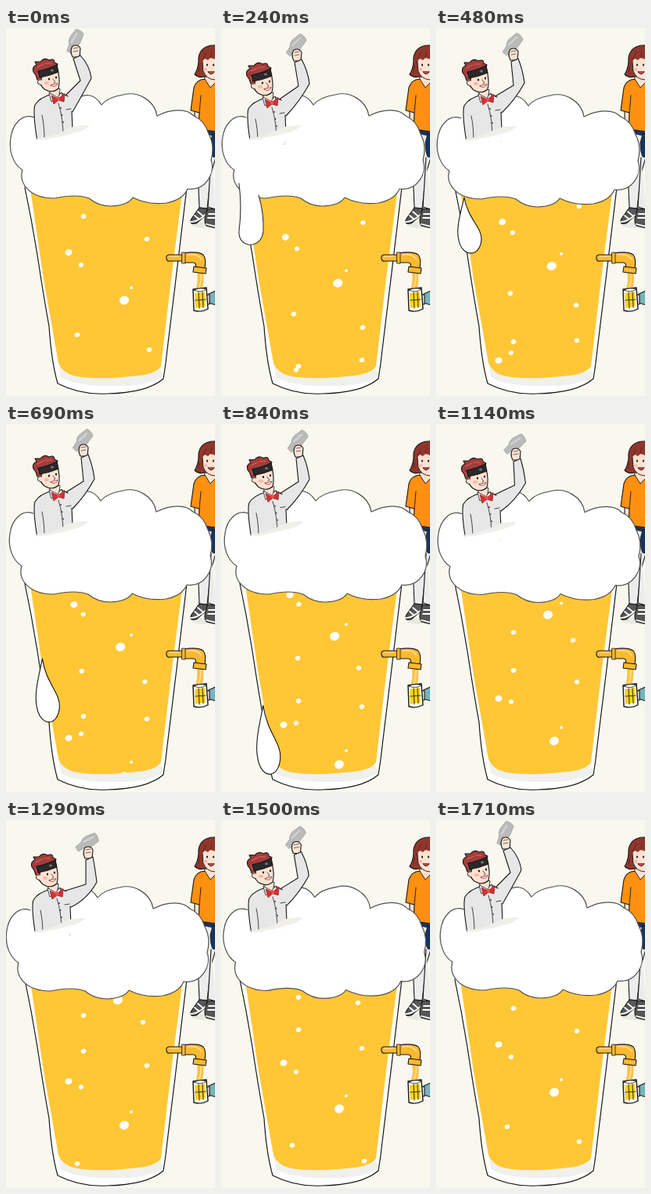
These frames come from a looping animation (267 by 469 pixels, 1.74 s). An HTML page with a canvas:

```html
<!DOCTYPE html>
<html lang="en">
<head>
<meta charset="utf-8">
<title>Beer tap</title>
<style>
html, body { margin: 0; width: 100%; height: 100%; overflow: hidden; background: #f8f8ef; }
canvas { display: block; width: 267px; height: 469px; }
</style>
</head>
<body>
<canvas id="stage" width="267" height="469"></canvas>
<script>
const ctx = document.getElementById('stage').getContext('2d');
const LOOP = 1740, STEP = 30;
const INK = '#161616', SKIN = '#fde2d2', BEER = '#ffc736', COAT = '#e7e7e7';
const HAIR = '#8f372d', BRASS = '#fdb931', NAVY = '#17345e';
const GLASS = 'M24 203 L32 243 L40 289 Q48 342 55 380 Q58 425 66 453 Q95 468 130 466 Q180 465 201 447 Q204 430 206 410 L217 320 L231 203';
const LIQUID = new Path2D('M31 205 L226 203 L211 320 L198 431 Q192 442 160 444 Q112 449 86 443 Q72 439 67 427 L48 320Z');
const FOAM = 'M36 114 C20 108 8 124 6 140 C3 158 10 174 21 181 C16 198 30 217 62 217 Q90 211 106 217 Q118 227 134 227 Q156 226 162 216 Q182 226 205 223 Q226 219 232 205 C254 208 268 186 262 168 Q267 150 259 135 Q254 118 240 112 C232 103 212 102 193 112 C190 92 168 80 150 85 Q130 88 122 98 Q108 76 86 93';

// time, foam x/y, man x/y, hand x/y, elbow x/y, bottle angle
const KEYS = [
  [0, 0, 0, 1, 0, 89, 28, 107, 66, -1.1],
  [240, -4, 0, -1, 5, 97, 33, 111, 73, -0.85],
  [480, -4, 1, 0, 1, 99, 32, 111, 72, -0.85],
  [690, -1, 0, 1, 1, 99, 32, 111, 72, -0.85],
  [990, -1, 0, -1, 4, 99, 34, 111, 73, -0.8],
  [1290, -5, 1, -1, 4, 105, 40, 114, 81, -0.55],
  [1680, 0, 0, 1, 0, 89, 28, 107, 66, -1.1],
  [LOOP, 0, 0, 1, 0, 89, 28, 107, 66, -1.1]
];

// x, y, radius, speed before and after the loop point, sideways drift per ms
const BUBBLES = [
  [91, 391, 3.3, .112, .11, .0083],
  [183, 410, 3.3, .118, .118, -.0083],
  [80, 286, 4.6, .112, .081, .01],
  [96, 302, 3.2, .091, .086, .004],
  [160, 331, 2.1, .098, .09, 0],
  [151, 347, 6.2, .1, .091, -.007],
  [180, 269, 3.3, .105, .087, .006],
  [99, 240, 3.4, .13, .12, 0]
];

function pose(t) {
  const i = KEYS.findIndex(k => k[0] > t), a = KEYS[i - 1], b = KEYS[i];
  const u = (t - a[0]) / (b[0] - a[0]);
  return a.map((v, n) => v + (b[n] - v) * u);
}

function shape(d, fill, line, width = 1.1) {
  const path = new Path2D(d);
  if (fill) { ctx.fillStyle = fill; ctx.fill(path); }
  if (line) { ctx.strokeStyle = line; ctx.lineWidth = width; ctx.stroke(path); }
}

function oval(x, y, rx, ry, fill, angle = 0) {
  ctx.beginPath();
  ctx.ellipse(x, y, rx, ry, angle, 0, 7);
  ctx.fillStyle = fill;
  ctx.fill();
}

function group(x, y, draw) {
  ctx.save();
  ctx.translate(x, y);
  draw();
  ctx.restore();
}

function woman() {
  oval(256, 251, 19, 4, '#e9e9e3');
  // legs and shoes
  shape('M245 130 L245 180 L247 229 L257 230 L262 185 L268 165 V130Z', '#ececec', INK);
  shape('M262 165 L258 228 L268 231', '#ececec', INK);
  shape('M247 229 L237 243 Q233 251 243 249 L257 237 L257 230Z', '#565656', INK);
  shape('M236 247 Q244 248 257 236 M241 239 l6 5 M245 234 l6 5', null, '#fff', 1.8);
  shape('M258 230 Q251 246 256 252 L268 255 V231Z', '#565656', INK);
  shape('M256 250 L268 253 M259 237 h8 M258 242 h9', null, '#fff', 1.8);
  // arm, shirt, belt and bag
  shape('M241 105 L241 125 L246 146 L250 143 L249 105Z', SKIN, INK);
  shape('M254 65 Q243 66 240 76 L236 105 L247 108 L246 129 L268 132 V68Z', '#ff9010', INK);
  shape('M247 108 L249 86', null, INK, .9);
  shape('M254 65 L261 76 L268 69 V60 H254Z', SKIN, INK, .9);
  shape('M245 129 L268 133 V138 L245 133Z', NAVY, INK, .6);
  shape('M264 135 L261 146 Q261 158 264 164 L268 165 V135Z', NAVY, INK, .8);
  // head
  shape('M268 22 C252 21 245 31 246 43 Q245 53 241 59 Q246 64 253 62 L268 62Z', HAIR, INK);
  shape('M251 40 Q255 35 268 33 V66 Q256 66 252 55Z', SKIN, INK, .9);
  shape('M249 44 Q251 36 254 31 L268 24 V40 L261 38 L258 41 L254 39Z', HAIR);
  shape('M252 40 L256 31 M261 38 L263 30 M247 48 L246 56', null, '#5b211b', .8);
  oval(257, 47, 1, 1.5, INK);
  oval(265, 47, 1, 1.5, INK);
  oval(255, 53, 2.4, 1.7, '#f7b4a8');
  shape('M258 56 Q262 62 266 56Z', '#d8484a', INK, .8);
}

function bubbles(t) {
  ctx.save();
  ctx.clip(LIQUID);
  for (const [x, y, r, before, after, drift] of BUBBLES) {
    const early = t - (LOOP - STEP);
    const dx = Math.max(-8, Math.min(8, drift * t));
    const dot = (px, py) => oval(px, py, r, r * .87, '#fffdf5', -.3);
    dot(x + dx, y - after * t);
    dot(x, y - before * early);
  }
  ctx.restore();
}

function glass(t) {
  shape(GLASS, '#fff');
  shape('M67 428 Q75 443 120 446 Q175 446 198 435 L200 445 Q178 457 140 456 Q90 457 70 445Z', '#f0f0ec');
  ctx.fillStyle = BEER;
  ctx.fill(LIQUID);
  bubbles(t);
  shape(GLASS, null, INK, 1.2);
}

function tap(t) {
  const sway = 1.5 * Math.sin(t / LOOP * Math.PI * 8);
  // stream
  shape(`M244 312 Q${246 + sway} 322 242 334 L250 335 Q${254 + sway} 322 252 312Z`, '#ffc247');
  shape(`M249 314 Q${250 + sway} 323 246 332`, null, '#ffe0a0', 1.5);
  // hand and mug
  shape('M268 335 L259 339 L256 344 L258 350 L268 353Z', '#74b5bd', INK);
  shape('M255 340 h5 v12 h-4', SKIN, INK);
  shape('M239 333 L256 331 L258 358 Q249 363 240 360Z', '#fff', INK, 1.4);
  shape('M241 338 L254 336 L255 355 L242 357Z', '#ffd21f');
  shape('M246 337 L247 357 M251 337 L252 356 M242 347 L255 346', null, '#3d3919', 1.1);
  shape('M240 334 Q248 330 256 333 Q249 338 240 334Z', '#fff', INK, .8);
  // pipe
  shape('M229 289 H208 Q204 290 205 294 Q206 298 210 297 H229Z', BRASS, INK);
  shape('M226 287 Q245 284 252 289 Q256 294 254 306 L242 306 Q244 299 239 299 H227Z', BRASS, INK);
  shape('M225 286 h4 v14 h-4Z', BRASS, INK, .8);
  shape('M240 304 L256 306 L255 313 L239 311Z', BRASS, INK);
  shape('M232 289 Q245 287 250 295 M209 291 h12', null, '#ffda88', 1.6);
}

function bottle(x, y, angle) {
  group(x - 1, y - 11, () => {
    ctx.rotate(angle);
    ctx.scale(1.1, 1.15);
    shape('M-14 -3 L-6 -4 Q-3 -7 2 -7 L13 -5 Q15 0 12 5 L0 6 Q-4 5 -7 3 L-14 3Z', '#bababa', '#a2a2a2', .7);
    shape('M-3 -3 L9 -2', null, '#d2d2d2', 2);
  });
}

function man(x, y, hx, hy, ex, ey, angle) {
  bottle(hx, hy, angle);
  shape(`M${hx - 4} ${hy + 9} Q${hx - 8} ${hy + 1} ${hx - 4} ${hy - 5} Q${hx + 3} ${hy - 8} ${hx + 6} ${hy - 2} L${hx + 5} ${hy + 9}Z`, SKIN, INK);
  shape(`M${hx - 3} ${hy - 2} l6 -1 M${hx - 3} ${hy + 2} l6 -1`, null, INK, .6);
  // raised sleeve
  shape(`M${74 + x} ${87 + y} L${ex - 12} ${ey + 1} L${hx - 3} ${hy + 11} L${hx + 6} ${hy + 7} Q${ex} ${ey - 18} ${ex + 2} ${ey - 2} Q${ex - 10} ${ey + 20} ${84 + x} ${107 + y}`, COAT, INK);
  group(x, y, () => {
    // coat
    shape('M58 84 Q40 90 36 98 Q33 108 38 144 L84 144 L83 106 L79 88 L70 83Z', COAT);
    shape('M39 144 Q33 108 36 98 Q41 89 58 84 L70 83 L78 87 M83 106 L84 130', null, INK);
    shape('M45 111 Q48 124 48 142 M66 96 Q72 115 72 138 M76 104 l6 -1', null, '#333', .9);
    for (const n of [0, 1, 2]) oval(69 + n * 1.5, 102 + n * 9, 1, 1, '#444');
    shape('M54 77 L56 87 L66 91 L68 78Z', SKIN, INK, .8);
    shape('M54 83 L57 94 L65 89 L72 91 L70 82 L65 88Z', '#fff', INK, .8);
    shape('M65 90 L57 86 L60 97 L66 92 L73 94 L74 84Z', '#d92f32', '#8d2024', .8);
    oval(66, 90, 2, 2.5, '#ef5350');
    // head
    shape('M42 59 Q40 71 48 78 Q58 84 66 77 Q69 66 64 50 L43 53Z', SKIN, INK);
    shape('M34 56 Q32 49 38 47 L36 43 L43 43 Q48 37 54 41 Q61 38 61 44 L65 46 L63 51 L45 58 L44 67 L39 66 L37 60Z', '#a33d3c', INK);
    shape('M39 50 l8 -4 M49 45 l8 0 M39 58 l2 4', null, '#cf6760', 1.1);
    shape('M40 55 Q52 53 64 47 L66 56 Q54 61 42 63Z', '#2b2929', INK);
    oval(58, 54, 2, 1.5, '#777');
    oval(42, 69, 3, 3.5, SKIN);
    shape('M43 66 Q38 66 40 71 L44 73', null, INK, .9);
    oval(54, 65, 1.1, 1.5, INK);
    oval(63, 63, 1.1, 1.5, INK);
    oval(51, 70, 3, 2, '#f8b8aa');
    shape('M59 65 l3 4 l-2 1', null, INK, .7);
    shape('M56 73 Q62 77 65 71Z', '#fff', '#a63432', .9);
  });
}

function foamFront() {
  shape('M31 149 L35 142 Q48 143 58 139 Q70 137 76 131 Q86 125 107 125 Q104 132 90 138 L80 154 L34 155Z', '#fff');
  shape('M37 141 Q58 139 74 131 Q86 123 107 124 Q99 132 86 134 Q74 138 60 140 Q48 145 37 141Z', '#f0efe9');
}

function drip(t) {
  if (t >= 30 && t < 450) {
    const end = t < 240 ? 215 + (t - 30) * .295 : 277 + (t - 240) * .035;
    const side = Math.max(205, end - 18);
    shape(`M23 198 Q27 ${(198 + side) / 2} 23 ${side} C22 ${end + 5} 52 ${end + 5} 54 ${side} Q55 ${(side + 213) / 2} 48 213`, '#fff', '#333', 1.1);
  } else if (t >= 450 && t < 1080) {
    const top = 216 + (t - 480) * .396;
    // the drop flattens when it reaches the foot of the glass
    const tall = 71 + (t - 480) * .047, room = Math.min(tall, 463 - top);
    const sx = Math.min(1.45, tall / room), sy = room / 71;
    const px = x => 36 + (top - 216) * .125 + x * sx, py = y => top + y * sy;
    const curve = (...c) => 'C' + c.map((v, i) => i % 2 ? py(v) : px(v)).join(' ');
    shape(`M${px(0)} ${py(0)}` + curve(-4, 18, -11, 39, -7, 54) + curve(-3, 76, 20, 77, 22, 54) + curve(23, 38, 5, 28, 0, 0) + 'Z', '#fff', INK, 1.1);
  }
}

function draw(now) {
  const t = Math.floor(now % LOOP / STEP) * STEP;
  const [, fx, fy, ...body] = pose(t);
  ctx.fillStyle = '#f8f8ef';
  ctx.fillRect(0, 0, 267, 469);
  ctx.lineJoin = ctx.lineCap = 'round';
  woman();
  glass(t);
  tap(t);
  group(fx, fy, () => shape(FOAM, '#fff', '#505050', 1.2));
  man(...body);
  group(fx, fy, foamFront);
  drip(t);
}

const start = performance.now();
function tick() {
  draw(performance.now() - start);
  requestAnimationFrame(tick);
}
tick();
</script>
</body>
</html>
```
